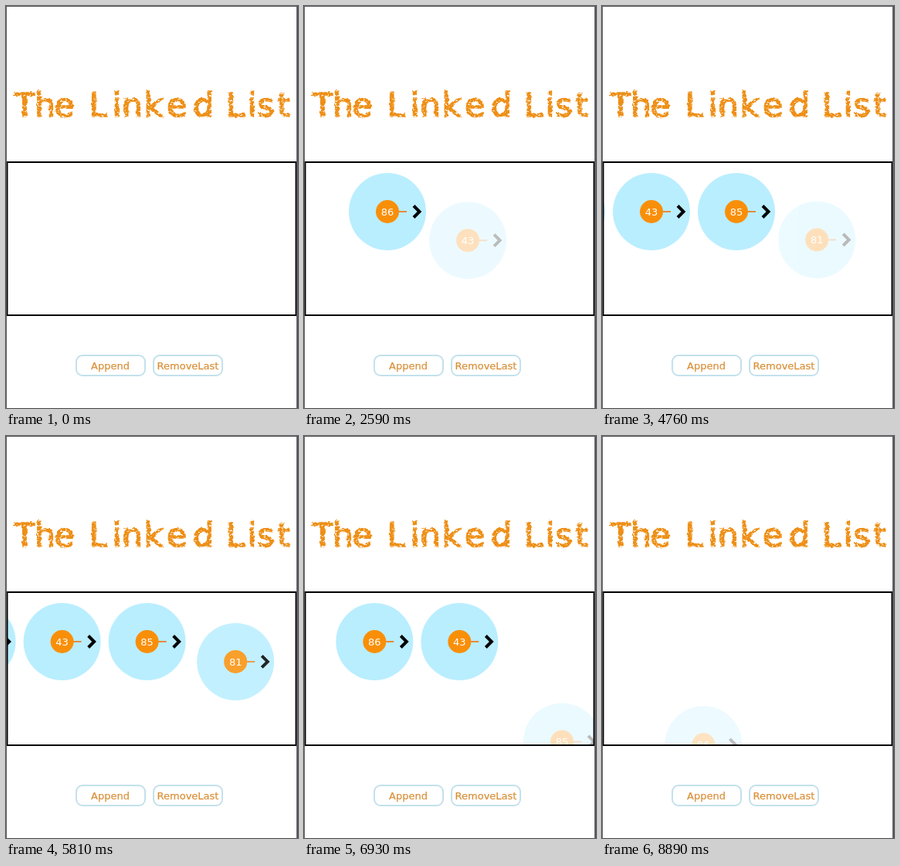
Recreate the animation shown at these times as an HTML page. Size 378x520 px, loop 8.96 s.

```html
<!DOCTYPE html>
<html lang="en">
<head>
<meta charset="utf-8">
<title>The Linked List</title>
<style>
  html, body { margin: 0; width: 100%; height: 100%; overflow: hidden; background: #fff; }
  svg { display: block; width: 378px; height: 520px; font: 13px "DejaVu Sans", sans-serif; }
  filter { color-interpolation-filters: sRGB; }
  .title { font-size: 42.5px; fill: #ee8f16; stroke: #ee8f16; stroke-width: 1.6; filter: url(#chalk); }
  .button rect { fill: #fff; stroke: #c3e1ec; stroke-width: 2; }
  .button text { fill: #d9913a; stroke: #d9913a; stroke-width: .25; text-anchor: middle; filter: url(#rough); }
  .node text { fill: #fff; text-anchor: middle; filter: url(#rough); }
</style>
</head>
<body>
<svg viewBox="0 0 378 520">
  <defs>
    <filter id="chalk" x="-2%" y="-10%" width="104%" height="120%">
      <feTurbulence type="fractalNoise" baseFrequency=".2" numOctaves="2" seed="4" result="noise"/>
      <feDisplacementMap in="SourceGraphic" in2="noise" scale="4" xChannelSelector="R" yChannelSelector="G" result="edge"/>
      <feTurbulence type="fractalNoise" baseFrequency=".3 .45" numOctaves="2" seed="9"/>
      <feColorMatrix values="0 0 0 0 0  0 0 0 0 0  0 0 0 0 0  6 0 0 0 -1.5" result="grain"/>
      <feComposite in="edge" in2="grain" operator="in"/>
    </filter>
    <filter id="rough">
      <feTurbulence type="fractalNoise" baseFrequency=".2" seed="2"/>
      <feDisplacementMap in="SourceGraphic" scale="1.4" xChannelSelector="R" yChannelSelector="G"/>
    </filter>
    <clipPath id="inside"><rect x="2" y="203" width="373" height="197"/></clipPath>
  </defs>

  <text class="title" y="142.5">
    <tspan x="11 37 62.5">The</tspan>
    <tspan x="107.5 137.5 150 178.5 208 242">Linked</tspan>
    <tspan x="285 312.5 325.5 351">List</tspan>
  </text>

  <g id="list" clip-path="url(#inside)"></g>
  <rect x="1.5" y="202" width="374" height="198" fill="none" stroke="#000" stroke-width="2"/>

  <g class="button">
    <rect x="91" y="452" width="89" height="26" rx="8"/>
    <text x="135" y="470">Append</text>
  </g>
  <g class="button">
    <rect x="191" y="452" width="89" height="26" rx="8"/>
    <text x="235.5" y="470">RemoveLast</text>
  </g>

  <path d="M0 .5H378M.5 0V520" stroke="#5c5c62"/>
  <rect x="376" width="2" height="520" fill="#595a64"/>
</svg>
<script>
const LOOP = 8960, MOVE = 1000, SCROLL = 300, LAG = 70, STEP = 110;

// scroll: how far the row shifts when the node comes or goes
const nodes = [
  { value: 86, add: 1230, remove: 8235, scroll: 0 },
  { value: 43, add: 2240, remove: 7360, scroll: 0 },
  { value: 85, add: 3350, remove: 6290, scroll: 44 },
  { value: 81, add: 4400, remove: 5545, scroll: 110 }
];

// Progress along cubic-bezier(.42, 0, .58, 1)
function ease(t, start, duration) {
  const x = Math.min(1, Math.max(0, (t - start) / duration));
  let lo = 0, hi = 1;
  for (let i = 0; i < 20; i++) {
    const u = (lo + hi) / 2, v = 1 - u;
    if (1.26 * v * v * u + 1.74 * v * u * u + u * u * u < x) lo = u; else hi = u;
  }
  return x === 0 || x === 1 ? x : lo * lo * (3 - 2 * lo);
}

const list = document.getElementById("list");
for (const node of nodes) {
  node.el = document.createElementNS("http://www.w3.org/2000/svg", "g");
  node.el.setAttribute("class", "node");
  node.el.innerHTML = `
    <circle r="50" fill="#b9eeff"/>
    <path d="M14 0H25" stroke="#e58a3c" stroke-width="2"/>
    <circle r="15" fill="#f98f08"/>
    <path d="M34 -7.5L41.5 0L34 7.5" fill="none" stroke="#000" stroke-width="4"/>
    <text y="4.7">${node.value}</text>`;
  list.append(node.el);
}

function draw(t) {
  const left = nodes.reduce((x, { add, remove, scroll }) =>
    x - scroll * (ease(t, add, SCROLL) - ease(t, remove + LAG, MOVE)), 108);
  nodes.forEach(({ el, add, remove }, i) => {
    const enter = 1 - ease(t, add, MOVE), leave = ease(t, remove, MOVE);
    const x = left + i * STEP - 8 * enter + 31 * leave;
    const y = 266 + 50 * enter + 177 * leave;
    el.setAttribute("transform", `translate(${x} ${y})`);
    el.setAttribute("opacity", (1 - enter) * (1 - leave));
  });
}

const began = performance.now();
function tick() {
  draw((performance.now() - began) % LOOP);
  requestAnimationFrame(tick);
}
tick();
</script>
</body>
</html>
```
